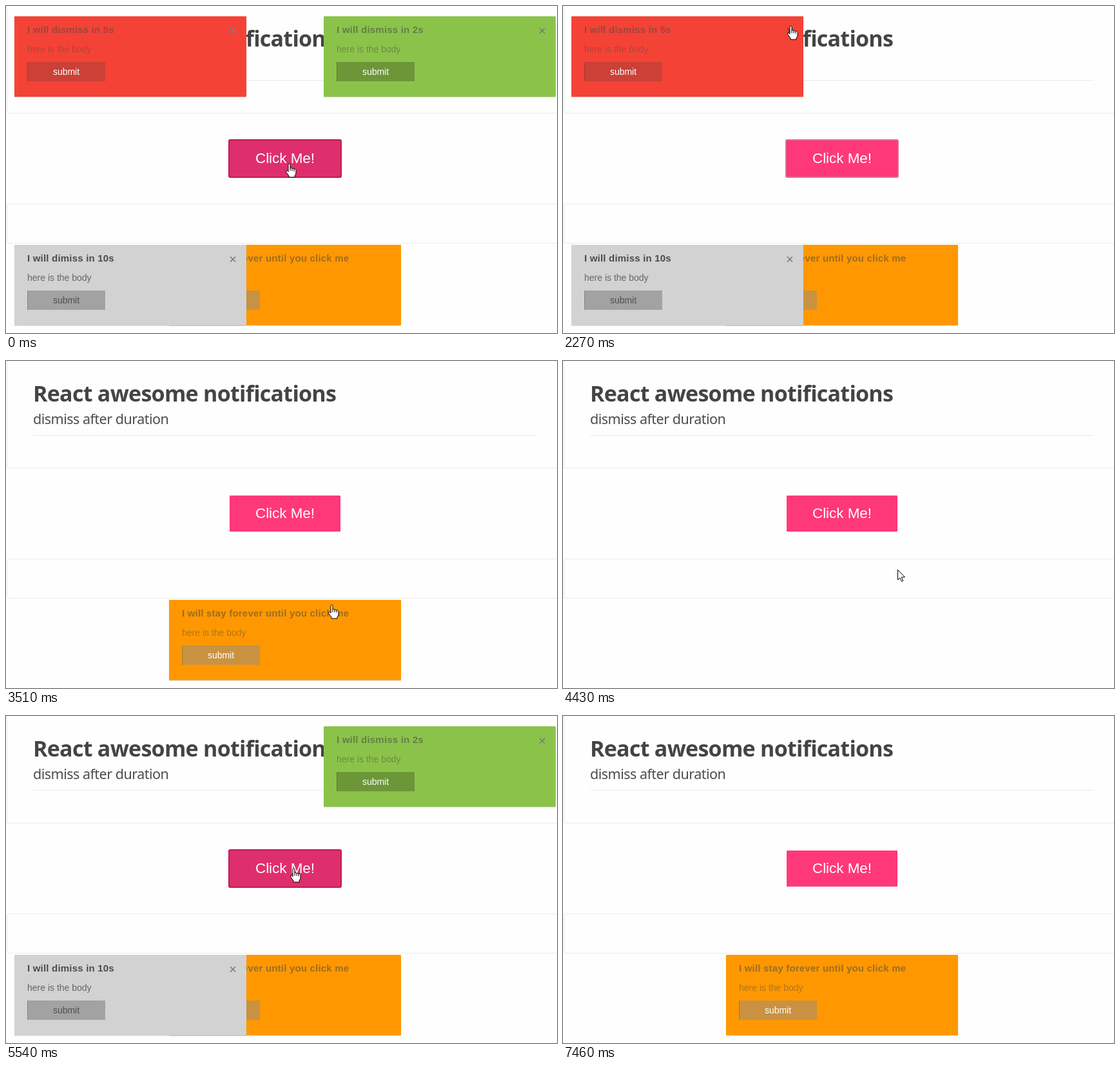
Recreate the animation shown at these times as an HTML page. Size 855 by 508 pixels, loop 8.17 s.

```html
<!DOCTYPE html>
<html lang="en">
<head>
<meta charset="utf-8">
<title>Notifications</title>
<style>
html, body { margin: 0; width: 100%; height: 100%; overflow: hidden; background: #fefefe; }
#stage { position: relative; width: 855px; height: 508px; overflow: hidden; font-family: Arial, "Liberation Sans", sans-serif; }
#stage * { position: absolute; box-sizing: border-box; margin: 0; white-space: nowrap; }
.panel { left: 1px; width: 900px; border: 1px solid #ebebeb; border-radius: 3px; }
h1, h2 { left: 42px; color: #444; font-family: "Segoe UI", "Open Sans", "Noto Sans", sans-serif; }
h1 { top: 25px; font-size: 34px; line-height: 50px; font-weight: 700; letter-spacing: -.72px; }
h2 { top: 75px; font-size: 21.5px; line-height: 30px; font-weight: 400; letter-spacing: -.5px; color: #4c4c4c; }
.rule { left: 42px; top: 115px; width: 782px; height: 1px; background: #ebebeb; }
#ring { left: 345px; top: 207px; width: 176px; height: 60px; border-radius: 3px; background: #c2185b; }
#click { left: 347px; top: 209px; width: 172px; height: 56px; border-radius: 1px; color: #fff; font-size: 22.4px; line-height: 55px; text-align: center; }
.card { width: 360px; height: 125px; border-radius: 1px; box-shadow: 0 1px 1px rgba(0,0,0,.16); }
.card b, .card p { left: 20px; line-height: 20px; color: #444; }
.card b { top: 11px; font-size: 15px; letter-spacing: .2px; }
.card p { top: 41px; font-size: 14px; }
.card span { left: 20px; top: 71px; width: 121px; height: 30px; font-size: 14px; line-height: 30px; text-align: center; box-shadow: inset 1px 0 rgba(0,0,0,.18); }
.card svg { left: 333px; top: 16px; fill: none; stroke-width: 1.7; }
#cursor { left: 0; top: 0; overflow: visible; fill: #fff; stroke: #000; stroke-linejoin: round; }
</style>
</head>
<body>
<div id="stage">
  <div class="panel" style="top:-10px;height:177px"></div>
  <div class="panel" style="top:307px;height:62px"></div>
  <h1>React awesome notifications</h1>
  <h2>dismiss after duration</h2>
  <div class="rule"></div>
  <div id="ring"></div>
  <div id="click">Click Me!</div>
  <svg id="cursor" width="1" height="1">
    <path id="hand" d="M-2 1.5Q-2 0-.5 0Q1 0 1 1.5V7Q2.5 5.8 4 7.5Q5.8 6.5 7 8.3Q9 7.5 10 9.5V14Q10 16 8 19V21H-1V19L-5 13.5Q-6.5 10.5-4 10.5L-2 12.5ZM1 7V11M4 7.5V11.5M7 8.3V12"/>
    <path id="arrow" d="M.5 .5V16L4 12.8L6.5 18.5L8.7 17.5L6.3 11.8H11.5Z"/>
  </svg>
</div>
<script>
const LOOP = 8170, FIRST = 580, STEP = 137.4;
const FADE = 220, BLUR = 250;
const PRESS = 5050, SHOW = 5150, HIDE = 7100;
const $ = id => document.getElementById(id);
const stage = $('stage'), cursor = $('cursor');

// gone: when the card leaves in the first and in the second round
const cards = [
  { x: 253, y: 371, title: 'I will stay forever until you click me', bg: '#ff9800', btn: '#c99242', label: '#fff', ink: .52, gone: [3600, LOOP] },
  { x: 13, y: 371, title: 'I will dimiss in 10s', bg: '#d2d2d2', btn: '#a2a2a2', label: '#505050', ink: .95, close: true, gone: [3235, HIDE] },
  { x: 13, y: 16, title: 'I will dismiss in 5s', bg: '#f44336', btn: '#cb4037', label: '#fff', ink: .48, close: true, gone: [2240, 0] },
  { x: 493, y: 16, title: 'I will dismiss in 2s', bg: '#8bc34a', btn: '#6c9638', label: '#fff', ink: .55, close: true, gone: [1150, HIDE] }
];

// each leg: departure, arrival, destination
const home = [440, 245];
const legs = [
  [450, 2000, 354, 31], [2390, 3180, 352, 400], [3200, 3450, 506, 379],
  [3850, 4420, 519, 324], [4430, PRESS, 447, 237], [5850, 6620, 352, 401]
];

const ramp = (t, from, span) => Math.min(1, Math.max(0, (t - from) / span));
const smooth = u => u * u * (3 - 2 * u);

// The picture advances in even steps and pauses while the third leg runs.
function clock(now) {
  const t = FIRST + Math.floor((now - FIRST) / STEP) * STEP;
  return t > legs[2][0] && t < legs[2][1] ? legs[2][0] : t;
}

function pointerAt(t) {
  return legs.reduce(([x, y], [from, to, tx, ty]) => {
    const u = smooth(ramp(t, from, to - from));
    return [x + (tx - x) * u, y + (ty - y) * u];
  }, home);
}

function cardAlpha({ gone }, t) {
  const shown = t < SHOW ? 1 : ramp(t, SHOW, FADE);
  return shown * (1 - ramp(t, gone[t < SHOW ? 0 : 1], FADE));
}

function buildCard(c) {
  const el = document.createElement('div');
  el.className = 'card';
  el.style.cssText = `left:${c.x}px;top:${c.y}px;background:${c.bg}`;
  el.innerHTML = `<b style="opacity:${c.ink}">${c.title}</b>
    <p style="opacity:${c.ink * .8}">here is the body</p>
    <span style="background:${c.btn};color:${c.label}">submit</span>` +
    (c.close ? '<svg width="12" height="12"><path d="M2 2.5L10 10.5M10 2.5L2 10.5"/></svg>' : '');
  stage.insertBefore(el, cursor);
  c.el = el;
  c.icon = el.querySelector('svg');
}
cards.forEach(buildCard);

function draw(now) {
  const t = clock(now);
  const [x, y] = pointerAt(t);
  const inside = (l, top, w, h) => x >= l && x < l + w && y >= top && y < top + h;
  const hover = inside(347, 209, 172, 56);
  let hand = hover;

  for (const c of cards) {
    const alpha = cardAlpha(c, t);
    c.el.style.opacity = alpha;
    if (alpha > .3 && inside(c.x, c.y, 360, 125)) hand = true;
    if (c.icon) c.icon.style.stroke = inside(c.x + 326, c.y + 9, 26, 26) ? '#444' : '#7c7c7c';
  }
  $('ring').style.opacity = 1 - ramp(t, t < PRESS ? 2130 : 6800, BLUR);
  $('click').style.background = hover ? '#de2f6c' : '#ff3879';
  cursor.style.transform = `translate(${Math.round(x)}px,${Math.round(y)}px)`;
  cursor.style.display = t < HIDE + FADE ? '' : 'none';
  $('hand').style.display = hand ? '' : 'none';
  $('arrow').style.display = hand ? 'none' : '';
}

const start = performance.now();
function loop() {
  draw((performance.now() - start) % LOOP);
  requestAnimationFrame(loop);
}
loop();
</script>
</body>
</html>
```
